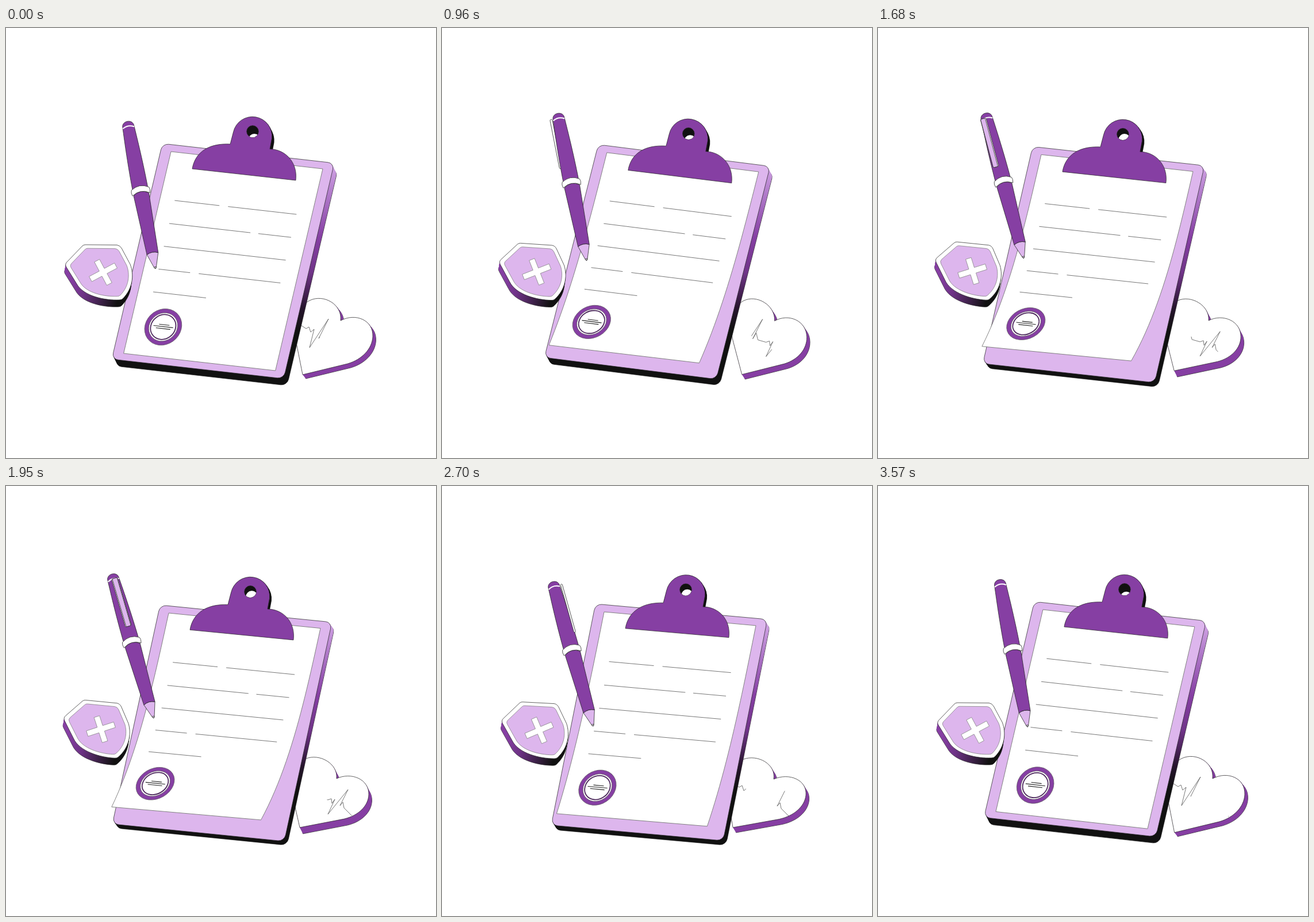
Animation of 748 by 748 pixels, one loop 3600 ms. Source, as an HTML page with a canvas:

```html
<!DOCTYPE html>
<html lang="en">
<head>
<meta charset="utf-8">
<title>Medical form</title>
<style>
  html, body { margin: 0; width: 100%; height: 100%; overflow: hidden; background: #fff; }
  canvas { display: block; width: 748px; height: 748px; }
</style>
</head>
<body>
<canvas id="stage" width="748" height="748"></canvas>
<script>
const ctx = document.getElementById('stage').getContext('2d');
const LOOP = 3600, STEP = 30;
const PURPLE = '#863fa3', LILAC = '#ddb6ed', BLACK = '#111', INK = '#222', WHITE = '#fff', GRAY = '#777';
const KEYS = [0, 540, 1410, 1950, 2700, 3180];

// Smooth periodic curve through one value per key time
function track(...values) {
  const n = KEYS.length;
  const time = i => KEYS[(i + n) % n] + Math.floor(i / n) * LOOP;
  const value = i => values[(i + n) % n];
  const slope = i => (value(i + 1) - value(i - 1)) / (time(i + 1) - time(i - 1));
  return t => {
    let i = n - 1;
    while (KEYS[i] > t) i--;
    const span = time(i + 1) - time(i), s = (t - time(i)) / span, r = 1 - s;
    return value(i) * r * r * (1 + 2 * s) + value(i + 1) * s * s * (3 - 2 * s)
      + span * s * r * (slope(i) * r - slope(i + 1) * s);
  };
}

const motion = {
  boardX: track(272, 273, 270, 268, 267, 270),
  boardY: track(201, 201, 205, 207, 205, 203),
  tilt: track(34, 38, 36, 30, 27, 29),
  sideX: track(-88, -95, -90, -83, -77, -82),
  sideY: track(375, 369, 374, 381, 385, 381),
  depthX: track(6, 5.5, 6, 5, 5, 5),
  depthY: track(12, 12, 9, 7, 8, 10),
  curl: track(0, 6, 20, 21.5, 10.5, 4),
  shieldX: track(169, 166, 164, 165, 169, 170),
  shieldY: track(425, 425, 423, 423, 425, 425),
  shieldTurn: track(0, 1.5, 5, 5, 2.5, 0),
  heartX: track(582, 581, 576, 575, 577, 580),
  heartY: track(509, 510, 509, 509, 510, 510),
  heartDepth: track(7, 7, 10, 11, 9, 8),
  tipX: track(-66, -59, -57, -64, -71, -70),
  tipY: track(94, 95, 90, 85, 84, 88),
  pulseStart: track(0, -28, 17, -3, 27, 22),
  pulseEnd: track(172, 152, 194, 174, 131, 165),
  penX: track(260, 254, 251, 257, 263, 263),
  penY: track(419, 411, 400, 404, 418, 422),
  penLean: track(10.8, 9.9, 13.1, 16.2, 15.7, 13),
  penRoll: track(0, -4, -22, -5, 0, 7)
};

const boardShape = new Path2D();
boardShape.roundRect(0, 0, 300, 380, 11);
const clampHead = 'L123.5 -20A34 34 0 0 1 190.5 -9L187 9.5';
const clampShape = new Path2D(`M52 44C57 14 82 -1 118 1${clampHead}C214 10 236 33 232 64Z`);
const clampKnob = new Path2D(`M118 1${clampHead}Z`);
const hole = new Path2D('M167.3 -21A10.3 10.3 0 1 1 146.7 -21A10.3 10.3 0 1 1 167.3 -21Z');
const shieldShape = new Path2D('M-31 -48L24 -47.5Q29 -47 32 -42L47 -14C54 4 52 28 34 46Q32 48 28 48'
  + 'C4 49 -34 42 -46 20L-64 -9Q-67 -14 -63 -18L-36 -46Q-34 -48 -31 -48Z');
const crossShape = new Path2D('M-25 -5H-5V-23H5V-5H25V5H5V23H-5V5H-25Z');
const heartShape = new Path2D('M0 94L-38 56C-60 34 -68 10 -58 -6C-46 -24 -12 -22 0 0'
  + 'C12 -20 42 -22 56 0C66 16 63 36 48 51Z');
const PULSE_LENGTH = 385;
const pulseShape = new Path2D('M-72 6L-60 14L-55 11L-52 20L-46 15L-54 47L-21 -3L-38 31L-32 21L-29 33L-15 37'
  + 'L-9 35L-8 43L-3 36L-15 62L20 19L6 47L11 41L13 51L28 66');
const pen = {
  nib: new Path2D('M-10 -27Q0 -32 10 -27L1.5 -1.5Q0 1 -1.5 -1.5Z'),
  barrel: new Path2D('M-10 -27L-13.5 -132Q0 -142 13.5 -132L10 -27Q0 -32 -10 -27Z'),
  cap: new Path2D('M-13.5 -143C-13.5 -185 -11.5 -225 -10 -253C-9 -264 9 -264 10 -253C11.5 -225 13.5 -185 13.5 -143Z'),
  ring: new Path2D('M-15.5 -132Q0 -142 15.5 -132Q17.5 -138 15.5 -142Q0 -152 -15.5 -142Q-17.5 -138 -15.5 -132Z'),
  band: new Path2D('M-10 -250Q0 -256 10 -250')
};

// Each row: height on the paper, then pairs of start and end
const textRows = [
  [.234, .097, .392, .449, .9],
  [.348, .097, .632, .684, .9],
  [.461, .097, .9],
  [.574, .097, .305, .362, .9],
  [.687, .097, .445]
];

function place(path, a, b, c, d, e, f) {
  const moved = new Path2D();
  moved.addPath(path, new DOMMatrix([a, b, c, d, e, f]));
  return moved;
}

function paint(path, fill, stroke = INK, width = .7) {
  if (fill) { ctx.fillStyle = fill; ctx.fill(path); }
  if (stroke) { ctx.strokeStyle = stroke; ctx.lineWidth = width; ctx.stroke(path); }
}

function extrude(path, dx, dy, fill) {
  for (let i = 16; i > 0; i--) {
    paint(place(path, 1, 0, 0, 1, dx * i / 16, dy * i / 16), fill, i === 16 ? INK : null);
  }
}

function gradient(x0, y0, x1, y1, ...stops) {
  const g = ctx.createLinearGradient(x0, y0, x1, y1);
  stops.forEach(([at, color]) => g.addColorStop(at, color));
  return g;
}

function drawShield(p) {
  const { shieldX: x, shieldY: y, shieldTurn: turn } = p;
  const turned = (path, degrees, size) => {
    const angle = degrees * Math.PI / 180;
    const c = Math.cos(angle) * size, s = Math.sin(angle) * size;
    return place(path, c, s, -s, c, x, y);
  };
  const face = turned(shieldShape, turn, 1);
  extrude(face, -2, 12, gradient(x - 55, y, x + 42, y + 25, [0, PURPLE], [.3, '#6d3285'], [.9, BLACK]));
  paint(face, WHITE);
  paint(turned(shieldShape, turn, .87), LILAC, GRAY);
  paint(turned(crossShape, 2 * turn - 28, 1), WHITE, GRAY);
}

function drawHeart(p, t) {
  const { heartX: x, heartY: y } = p;
  const face = place(heartShape, 1, .5, p.tipX / 94, p.tipY / 94, x, y);
  extrude(face, 5.5, p.heartDepth, PURPLE);
  paint(face, WHITE);
  const start = PULSE_LENGTH * t / LOOP + p.pulseStart;
  const shown = p.pulseEnd - p.pulseStart;
  ctx.save();
  ctx.clip(face);
  ctx.setLineDash([shown, PULSE_LENGTH - shown]);
  ctx.lineDashOffset = -start;
  paint(place(pulseShape, 1, 0, 0, 1, x, y), null, '#555', .8);
  ctx.restore();
}

function drawBoard(p) {
  const { boardX: x, boardY: y, tilt, sideX, sideY, depthX, depthY } = p;
  const face = place(boardShape, 299 / 300, tilt / 300, sideX / 380, sideY / 380, x, y);
  extrude(face, depthX, depthY, gradient(0, 235, 0, 575,
    [0, '#d3a6e6'], [.16, '#b07ac9'], [.38, PURPLE], [.56, '#703488'], [.74, '#27142e'], [.86, BLACK]));
  paint(face, LILAC);
}

function drawPaper(p) {
  const across = [264, p.tilt * .883], down = [p.sideX * .936, p.sideY * .936];
  const bend = [-p.curl, -.9 * p.curl], corner = [p.boardX + 15, p.boardY + 14];
  const at = (u, v) => [0, 1].map(i =>
    corner[i] + u * across[i] + v * down[i] + v ** 3 * bend[i] * (1 + .2 * u));

  const sheet = new Path2D();
  for (let i = 0; i <= 24; i++) sheet.lineTo(...at(0, i / 24));
  for (let i = 24; i >= 0; i--) sheet.lineTo(...at(1, i / 24));
  sheet.closePath();
  paint(sheet, WHITE, GRAY, .9);

  const rules = new Path2D();
  for (const [v, ...ends] of textRows) {
    for (let i = 0; i < ends.length; i += 2) {
      rules.moveTo(...at(ends[i], v));
      rules.lineTo(...at(ends[i + 1], v));
    }
  }
  paint(rules, null, GRAY, 1);

  const v = .851, grow = 3 * v * v;
  const onSeal = path => place(path, 1, across[1] / 264,
    (down[0] + grow * bend[0]) / 351, (down[1] + grow * bend[1]) / 351, ...at(.214, v));
  const disc = r => {
    const circle = new Path2D();
    circle.arc(0, 0, r, 0, 7);
    return onSeal(circle);
  };
  paint(disc(31.5), PURPLE, '#555');
  paint(disc(24.5), WHITE, '#555');
  paint(disc(21.5), WHITE, '#4d2a5c', 1.8);
  paint(onSeal(new Path2D('M-8 -4H10M-17 -.7H17M-12 2.8H13')), null, INK, 1.1);
}

function drawClamp(p) {
  const fit = path => place(path, 1, (p.tilt - 34) / 299, 0, 1, p.boardX, p.boardY);
  extrude(fit(clampKnob), p.depthX * .6, p.depthY * .6, BLACK);
  paint(fit(clampShape), PURPLE);
  const opening = fit(hole);
  paint(opening, BLACK);
  ctx.save();
  ctx.clip(opening);
  paint(place(opening, 1, 0, 0, 1, p.depthX * .5, p.depthY * 1.1 + 1), WHITE, null);
  ctx.restore();
}

function drawPen(p, t) {
  const roll = (t / 10 - 180 + p.penRoll) * Math.PI / 180;
  const sin = Math.sin(roll), cos = Math.cos(roll);
  const bar = (x, half, fill) => {
    const strip = new Path2D();
    strip.roundRect(x - half, -253, half * 2, 87, Math.min(half, 2));
    paint(strip, fill);
  };
  const drawClip = () => {
    bar(13.5 * sin, 4 * Math.abs(cos) + 1.5, WHITE);
    if (cos > .05) bar(15 * sin, 2.5 + 1.8 * cos, LILAC);
  };
  ctx.save();
  ctx.translate(p.penX, p.penY);
  ctx.rotate(-p.penLean * Math.PI / 180);
  if (cos < 0) drawClip();
  paint(pen.nib, LILAC);
  paint(new Path2D('M-1.8 -3.5L1.8 -3.5L0 0Z'), WHITE);
  paint(pen.barrel, PURPLE);
  paint(pen.cap, PURPLE);
  paint(pen.band, null, WHITE, 2);
  paint(pen.ring, WHITE);
  if (cos >= 0) drawClip();
  ctx.restore();
}

function draw(now) {
  const t = Math.floor(now % LOOP / STEP) * STEP;
  const pose = {};
  for (const name in motion) pose[name] = motion[name](t);
  ctx.fillStyle = WHITE;
  ctx.fillRect(0, 0, 748, 748);
  drawHeart(pose, t);
  drawBoard(pose);
  drawPaper(pose);
  drawClamp(pose);
  drawShield(pose);
  drawPen(pose, t);
}

const begin = performance.now();
function loop() {
  draw(performance.now() - begin);
  requestAnimationFrame(loop);
}
loop();
</script>
</body>
</html>
```
